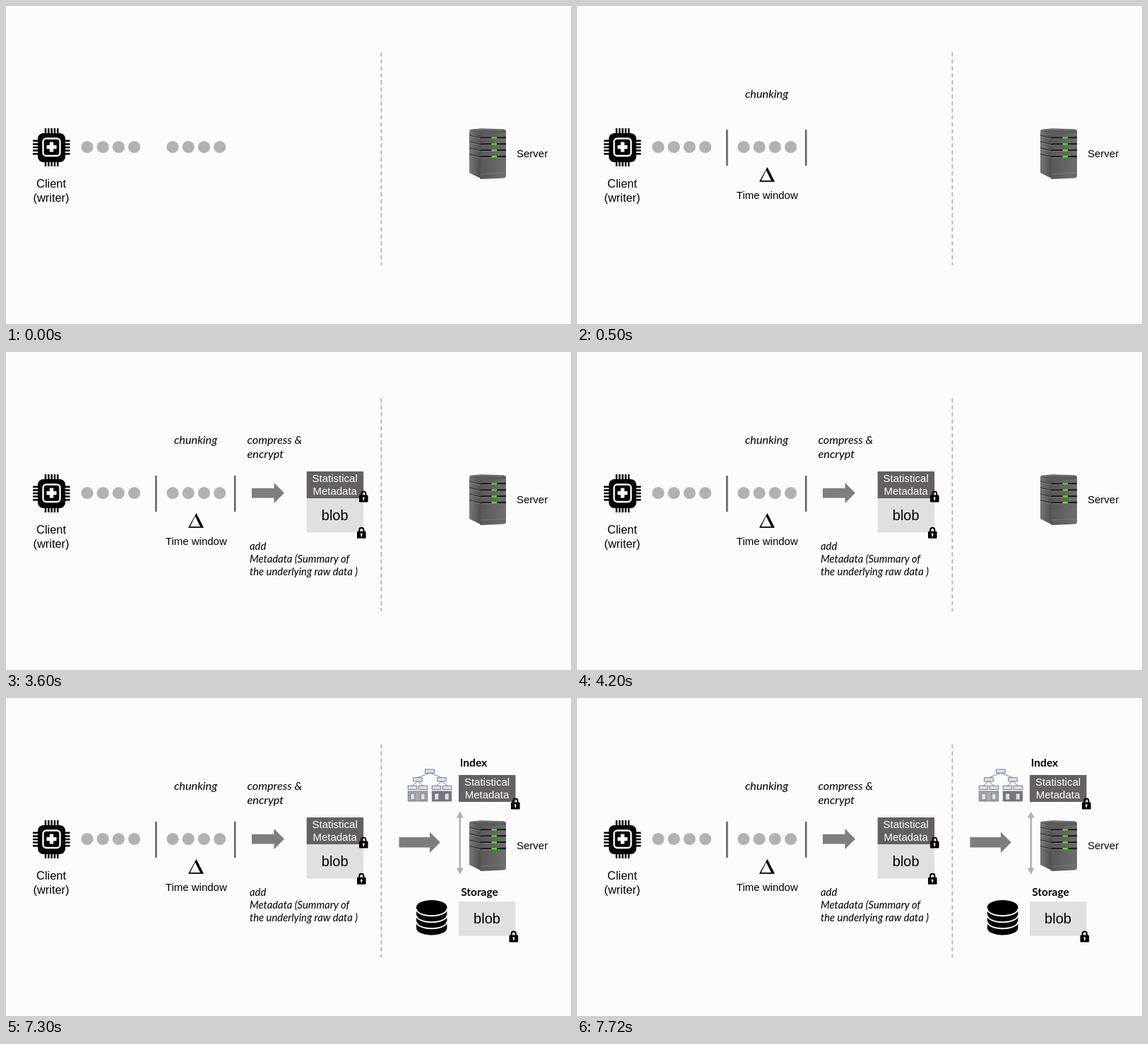
Write an HTML page that moves like this. It is 800 px wide and 450 px high and loops after 8 s.

```html
<!DOCTYPE html>
<html lang="en">
<head>
<meta charset="utf-8">
<title>Encrypted chunk pipeline</title>
<style>
  html, body { margin: 0; width: 100%; height: 100%; overflow: hidden; background: #fdfcfd; }
  svg { display: block; width: 100%; height: 100%; }
  text { font: 15px "Liberation Sans", Arial, sans-serif; }
  .mid { text-anchor: middle; }
  .client { font-size: 16.4px; }
  .blob { font-size: 20px; }
  .step { font: italic 16.3px Lato, sans-serif; }
  .note { font: italic 14.8px Lato, sans-serif; }
  .head { font: bold 15.5px Lato, sans-serif; }
</style>
</head>
<body>
<svg viewBox="0 0 800 450">
  <defs>
    <linearGradient id="front">
      <stop stop-color="#585858"/><stop offset="1" stop-color="#6e6e6e"/>
    </linearGradient>
    <linearGradient id="side">
      <stop stop-color="#787878"/><stop offset="1" stop-color="#4e4e4e"/>
    </linearGradient>
    <g id="lock">
      <path d="M3.2 8V4.5a3.1 3.1 0 0 1 6.2 0V8" fill="none" stroke="#000" stroke-width="2"/>
      <rect y="6.5" width="12.6" height="10" rx="1.2"/>
      <path d="M6.3 9.3a1.4 1.4 0 0 1 .7 2.6v2H5.6v-2a1.4 1.4 0 0 1 .7-2.6" fill="#fff"/>
    </g>
    <g id="metadata">
      <rect width="80.5" height="38" fill="#656162"/>
      <g class="mid" fill="#fff">
        <text x="40" y="15">Statistical</text>
        <text x="40" y="33">Metadata</text>
      </g>
    </g>
    <g id="blob">
      <rect width="80.5" height="48.5" fill="#e1e0e1"/>
      <text class="mid blob" x="40" y="30.5">blob</text>
    </g>
  </defs>

  <!-- client chip -->
  <g id="pins" stroke="#000" stroke-width="2.5"></g>
  <rect x="45" y="180" width="39" height="41" rx="8"/>
  <rect x="52.5" y="187.5" width="24" height="24.5" rx="4.5" fill="none" stroke="#fff" stroke-width="2.4"/>
  <path d="M57.500 199.600h14M64.500 192.600v14" stroke="#fff" stroke-width="5.4"/>
  <text class="mid client" x="64" y="257">Client</text>
  <text class="mid client" x="64" y="277">(writer)</text>

  <g id="dots" fill="#b3b2b3"></g>
  <path d="M531.4 65.5V367" stroke="#b0afb0" stroke-width="1.7" stroke-dasharray="6 3.9"/>

  <!-- server -->
  <path d="M656 177l16 5v62l-16-8z" fill="url(#side)"/>
  <path d="M671.5 181l36.5-2v61q0 3-3 3.4l-33.5 1.600z" fill="url(#front)"/>
  <path d="M656 177q0-2 3-2.600l14-1.200 31 1q4 .5 4 3.500v2l-36 2.500z" fill="#5b5b5b"/>
  <path d="M658 176l15-1.600 30 1.200" fill="none" stroke="#8b8b8b" stroke-width=".8"/>
  <path d="M672 238l36-2" stroke="#828282" stroke-width=".8"/>
  <g id="slots"></g>
  <text x="723" y="214">Server</text>

  <g data-at="500">
    <text class="mid step" x="268.5" y="130">chunking</text>
    <path d="M212.4 175v51M324.2 175v51" stroke="#666" stroke-width="2.6"/>
    <path aria-label="Δ" fill-rule="evenodd" d="M269.500 228L280 248.700H258zM267.800 232.500L260.700 246.900H275z"/>
    <text class="mid" x="269.3" y="272.5">Time window</text>
  </g>

  <g data-at="3600">
    <text class="step" x="341.5" y="130">compress &amp;</text>
    <text class="step" x="341.5" y="150">encrypt</text>
    <path d="M348 192.800h31.500V185L394 199.500 379.500 214v-7.500H348z" fill="#7f7e7f"/>
    <use href="#metadata" x="425.7" y="169"/>
    <use href="#blob" x="425.7" y="207"/>
    <use href="#lock" x="500" y="196"/>
    <use href="#lock" x="497" y="247.3"/>
    <text class="note" x="345" y="280">add</text>
    <text class="note" x="345" y="298">Metadata (Summary of</text>
    <text class="note" x="345" y="316">the underlying raw data )</text>
  </g>

  <g data-at="7300">
    <path d="M556.500 197H600v-7.300L614.800 204.300 600 219v-7.500H556.500z" fill="#7f7e7f"/>
    <text class="mid head" x="662" y="97">Index</text>
    <g id="tree" fill="#dce1ea" stroke="#68717f" stroke-width=".9"></g>
    <use href="#metadata" x="641" y="109"/>
    <use href="#lock" x="715" y="141"/>
    <path d="M642.8 167v76" stroke="#b2b1b2" stroke-width="2.6"/>
    <path d="M642.8 160.5l5 9h-10zM642.8 249.5l5-9h-10z" fill="#b2b1b2"/>
    <text class="mid head" x="670.5" y="280">Storage</text>
    <path d="M581 295.700a21.700 9.700 0 0 1 43.400 0v30a21.700 9.700 0 0 1-43.400 0z"/>
    <g id="rings" fill="none" stroke="#fdfcfd" stroke-width="1.9"></g>
    <use href="#blob" x="641" y="288"/>
    <use href="#lock" x="712.5" y="329"/>
  </g>
</svg>
<script>
const LOOP = 8000;
const fill = (id, markup) => document.getElementById(id).innerHTML = markup;
const repeat = (count, draw) => Array.from({ length: count }, (_, i) => draw(i)).join('');
const path = (d, attrs = '') => `<path d="${d}" ${attrs}/>`;
const rect = (x, y, w, h, attrs = '') =>
  `<rect x="${x}" y="${y}" width="${w}" height="${h}" ${attrs}/>`;

fill('pins', repeat(5, i => {
  const x = 56 + i * 4.3, y = 190.8 + i * 4.6;
  return path(`M${x} 173v8M${x} 220v7M38 ${y}h8M83 ${y}h7.5`);
}));

fill('dots', repeat(8, i =>
  `<circle cx="${(i < 4 ? 115 : 236) + i % 4 * 22.2}" cy="199.5" r="8.6"/>`));

fill('slots', repeat(4, i => {
  const y = 186 + i * 8.9;
  return path(`M656 ${y - 3}l16 4 36-1.5`, 'fill="none" stroke="#343434" stroke-width="1.2"')
    + path(`M657 ${y - 1.5}l15 4`, 'stroke="#858585" stroke-width=".8"')
    + path(`M673 ${y + 2}l35-1.3`, 'stroke="#8c8c8c" stroke-width=".8"')
    + path(`M672 ${y + .4}h36`, 'stroke="#151515" stroke-width="1.8"')
    + path(`M687.5 ${y + .4}h7.5`, 'stroke="#55e51c" stroke-width="2.2"');
}));

const node = (x, y) => rect(x - 6.3, y, 12.6, 5.2);
const fork = (x, y, spread, drop) =>
  path(`M${x - spread} ${y + drop}L${x} ${y}l${spread} ${drop}`, 'fill="none"');
const leaves = (x, shade) => rect(x - 13.7, 132, 27.4, 14, `fill="${shade}"`)
  + [-7.2, 7.2].map(dx => rect(x + dx - 3, 135, 6, 9)).join('');
const branch = (x, shade) => fork(x, 118, 7.5, 6) + node(x, 112.8)
  + node(x - 7.5, 124.3) + node(x + 7.5, 124.3) + leaves(x, shade);
fill('tree', fork(600, 106, 17.5, 7) + node(600, 101)
  + branch(583, '#aaa') + branch(617, '#777'));

fill('rings', repeat(3, i => path(`M581 ${298.5 + i * 9}a21.7 9.7 0 0 0 43.4 0`)));

const stages = [...document.querySelectorAll('[data-at]')];
function draw() {
  const time = performance.now() % LOOP;
  for (const stage of stages)
    stage.style.visibility = time >= +stage.dataset.at ? 'visible' : 'hidden';
  requestAnimationFrame(draw);
}
draw();
</script>
</body>
</html>
```
